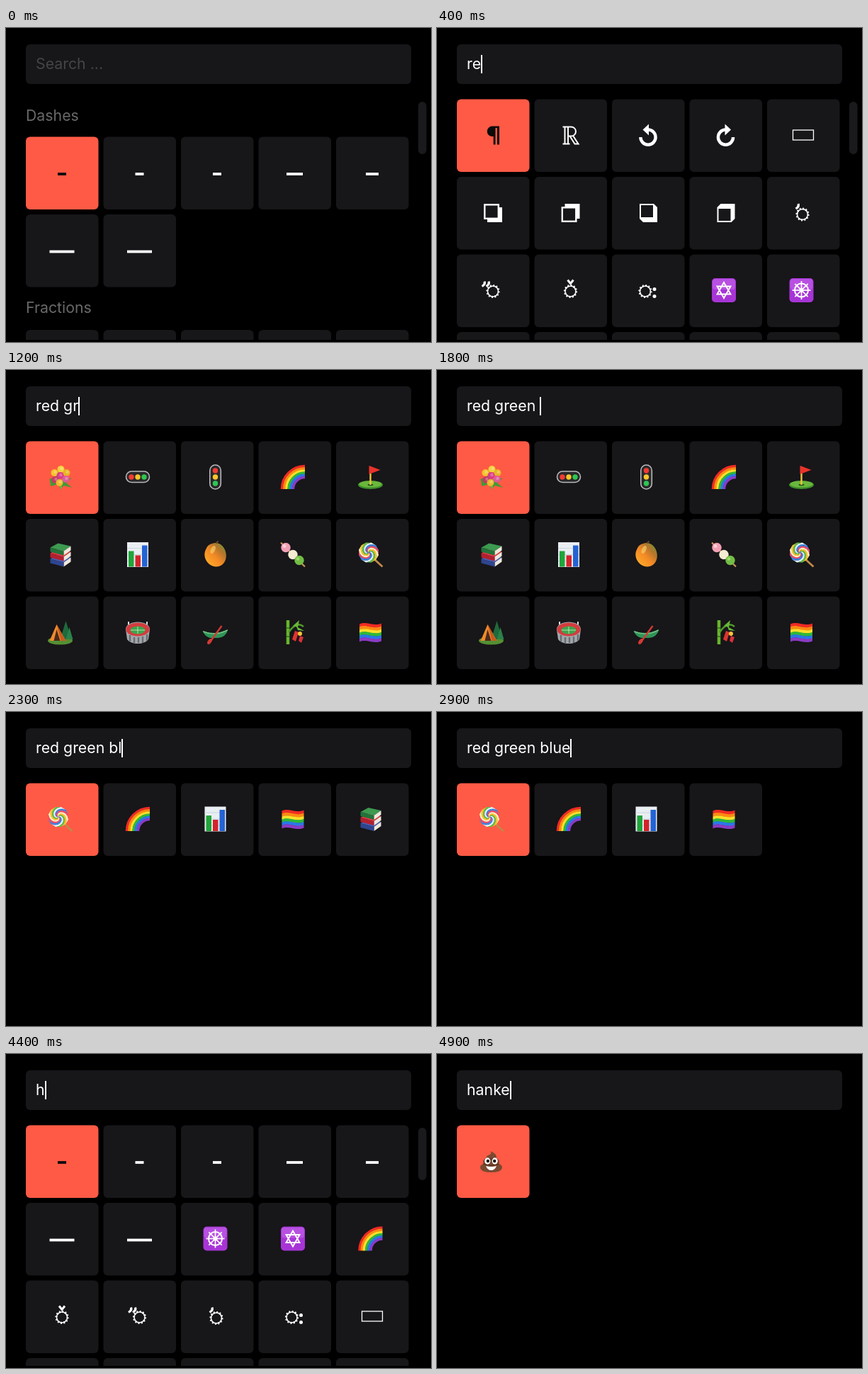
These frames come from a looping animation (600x443 px, 5000 ms). An HTML page:

```html
<!DOCTYPE html>
<html lang="en">
<head>
<meta charset="utf-8">
<title>Symbol search</title>
<style>
  html, body { margin: 0; width: 100%; height: 100%; overflow: hidden; background: #000; }
  #stage { position: relative; width: 600px; height: 443px; overflow: hidden; font: 21.3px Inter, sans-serif; }
  #field { position: absolute; left: 28px; top: 23px; width: 544px; height: 56px; border-radius: 6px; background: #171619; }
  #query { position: absolute; left: 14px; top: 0; line-height: 55px; white-space: pre; color: #fff; }
  #query.empty { color: #454447; }
  #caret { position: absolute; top: 15px; width: 2px; height: 26px; background: #fff; }
  svg { position: absolute; left: 0; top: 0; }
  svg text { fill: #69686b; }
</style>
</head>
<body>
<div id="stage">
  <svg id="view" width="600" height="443"></svg>
  <div id="field"><span id="query"></span><i id="caret"></i></div>
</div>
<script>
const LOOP = 5000;
const $ = id => document.getElementById(id);

// Drawing helpers; every glyph is centred on 0,0.
const path = (d, fill, extra = '') => `<path d="${d}" fill="${fill}" ${extra}/>`;
const line = (d, color, w = 2) => path(d, 'none', `stroke="${color}" stroke-width="${w}"`);
const oval = (x, y, rx, ry, fill, extra = '') =>
  `<ellipse cx="${x}" cy="${y}" rx="${rx}" ry="${ry}" fill="${fill}" ${extra}/>`;
const dot = (x, y, r, fill, extra) => oval(x, y, r, r, fill, extra);
const rect = (x, y, w, h, fill, r = 0, extra = '') =>
  `<rect x="${x}" y="${y}" width="${w}" height="${h}" rx="${r}" fill="${fill}" ${extra}/>`;
const group = (transform, body) => `<g transform="${transform}">${body}</g>`;

const RAINBOW = ['#f02b24', '#ff8a12', '#ffe02a', '#2fb83a', '#2a78e8', '#8b3bc4'];

const ring = (x, y) =>
  `<circle cx="${x}" cy="${y}" r="7.6" fill="none" stroke="#fff" stroke-width="1.5"/>` +
  `<circle cx="${x}" cy="${y}" r="8" fill="none" stroke="#fff" stroke-width="3.2" stroke-dasharray="1.7 2.49"/>`;
const tick = x => line(`M${x} -13q1.5 4 -3.5 7`, '#fff', 3.2);
const badge = body => rect(-17, -17, 34, 34, '#a735d6', 5) +
  rect(-16, -16, 32, 15, '#b850e2', 4) + body;
const lamps = spots => spots.map(([x, y], i) =>
  dot(x, y, 3.7, ['#f23b32', '#fbc52b', '#2fc552'][i])).join('');

const turn = line('M0 -8A10.6 10.6 0 1 1 -10.6 2.6', '#fff', 4.4) + path('M1 -16V0L-7.5 -8z', '#fff');

function swirl() {
  const arms = 12, colors = ['#ef4a6b', '#fff3c4', '#f7c32e', '#5cbf4a', '#e8f4ff', '#3d83e0'];
  const edge = k => Array.from({ length: 9 }, (_, i) => {
    const r = i * 14.5 / 8, a = (k / arms) * 2 * Math.PI + i * 0.36;
    return [(r * Math.cos(a)).toFixed(1), (r * Math.sin(a)).toFixed(1)];
  });
  return Array.from({ length: arms }, (_, k) =>
    path('M' + edge(k).concat(edge(k + 1.08).reverse()).join('L') + 'z', colors[k % 6])).join('');
}

function book(y, cover, spine) {
  return path(`M-14 ${y}L-3 ${y - 6}L15 ${y - 2}L5 ${y + 5}z`, cover) +
    path(`M5 ${y + 5}L15 ${y - 2}V${y + 4}L5 ${y + 11}z`, '#eee8dc') +
    path(`M-14 ${y}L5 ${y + 5}V${y + 11}L-14 ${y + 6}z`, spine);
}

const symbols = {
  pilcrow: path('M9 -13H-1a7.3 7.3 0 0 0 0 14.6h1.7V13h2.8V-10.4h2.4V13H9z', 'currentColor'),
  reals: line('M-11 -12H1a6.5 6.5 0 0 1 0 13H-4M-8 -12V12M-3.5 -12V12M-11 12H-1M-1 1L6 12H11L3.5 .5', '#fff'),
  undo: turn,
  redo: group('scale(-1 1)', turn),
  bar: rect(-14.5, -7.5, 29, 14, 'none', 0, 'stroke="#fff" stroke-width="1.3"'),
  dropLow: rect(-8, -8, 21, 21, '#fff') + rect(-11.7, -11.7, 19.5, 19.5, '#171619', 0, 'stroke="#fff" stroke-width="2.4"'),
  dropHigh: rect(-8, -13, 21, 21, '#fff') + rect(-11.7, -7.7, 19.5, 19.5, '#171619', 0, 'stroke="#fff" stroke-width="2.4"'),
  boxLow: path('M-12 -13H8L13 -8V13H-7L-12 8z', '#fff') + rect(-10, -11, 17, 17, '#171619'),
  boxHigh: path('M-12 -8L-7 -13H13V8L8 13H-12z', '#fff') + rect(-10, -6, 17, 17, '#171619'),
  single: tick(-7) + ring(-1, 2),
  double: tick(-12) + tick(-6) + ring(0, 1),
  caron: line('M-4 -15L0 -10L4 -15', '#fff', 3) + ring(0, 1),
  colon: ring(-4, 1) + dot(9, -2, 2.5, '#fff') + dot(9, 8, 2.5, '#fff')
};

const emoji = {
  star: badge(line('M0 -11L9.5 5.5H-9.5zM0 11L-9.5 -5.5H9.5z', '#fff', 1.9)),
  wheel: badge(dot(0, 0, 9.5, 'none', 'stroke="#fff" stroke-width="2"') + dot(0, 0, 3, '#fff') +
    [0, 45, 90, 135].map(a => group(`rotate(${a})`, line('M-13 0H13', '#fff', 1.7))).join('')),
  bouquet: path('M-15 3L-4 -2L2 6L16 1L9 9L17 15L5 12L1 17L-3 10L-13 13z', '#3f9a35') +
    line('M-2 3L2 16M4 2L0 14', '#6fbb3f') +
    [[-8, -6, '#f4c52c'], [1, -11, '#f2d23c'], [9, -6, '#e8b524'], [0, -2, '#d83d86'], [-7, 4, '#c43a63'],
     [8, 3, '#df5b9a'], [-1, 8, '#efb72f']].map(([x, y, c]) => dot(x, y, 5, c) + dot(x + 1, y - 1, 2.2, '#fff4')).join(''),
  lightsH: rect(-16.5, -8, 33, 15.5, '#29292b', 7.7, 'stroke="#b9b9bb" stroke-width="1.6"') +
    lamps([[-9, 0], [0, 0], [9, 0]]),
  lightsV: rect(-7.7, -17, 15.5, 34, '#29292b', 7.7, 'stroke="#b9b9bb" stroke-width="1.6"') +
    lamps([[0, -9], [0, 0], [0, 9]]),
  rainbow: RAINBOW.map((c, i) => {
    const r = 32.5 - i * 3.2;
    return line(`M${17 - r} 17A${r} ${r} 0 0 1 17 ${17 - r}`, c, 3.5);
  }).join(''),
  golf: oval(0, 11, 17.5, 6, '#3f8f2c') + oval(0, 10, 16, 4.6, '#69b83c') + oval(0, 11, 4, 1.3, '#24511d') +
    line('M0 -15V11', '#f3c43c', 2.4) + path('M-2 -16L14 -10L-2 -4z', '#ea3329'),
  books: book(6, '#4a61b8', '#2f458e') + book(-2, '#e23b43', '#b3202e') + book(-10, '#3d9a50', '#23733a'),
  chart: rect(-15, -17.5, 30, 35, '#e9eef3') + line('M-15 -9H15M-15 0H15M-15 9H15', '#cbd5df', 1) +
    rect(-13, -5, 7.5, 22, '#20a43a') + rect(-3.5, 1, 7.5, 16, '#d3242c') + rect(6, -13, 7.5, 30, '#2463d4'),
  mango: path('M-3 -16C9 -19 17 -6 15 5C13 15 4 19 -4 16C-14 12 -18 0 -13 -8C-11 -13 -8 -15 -3 -16z', 'url(#mango)') +
    line('M1 -16L4 -19', '#6b4a22', 2) + oval(-6, -5, 3, 6, '#ffe37a88', 'transform="rotate(25)"'),
  dango: line('M-17 -17L17 17', '#c99452', 2.2) + dot(-10, -10, 6.7, '#f2a0b5') + dot(0, 0, 6.7, '#f5ecd2') +
    dot(9, 8, 6.7, '#72bd45') + dot(-12, -12, 2.4, '#ffd0db') + dot(7, 6, 2.2, '#9dda6c'),
  lollipop: line('M5 6L17 17', '#c08a4a', 2.8) + group('translate(-2.5 -3)', swirl()),
  tent: oval(0, 12, 17.5, 5.5, '#548f33') + path('M8 -16L16 10H0z', '#1f6a3c') + path('M13 -7L18 10H8z', '#2c8049') +
    path('M-5 -11L8 12H-15z', '#ef8a2c') + path('M-5 -11L8 12H1z', '#c95a1d') + path('M-5 -4L0 12H-9z', '#4a2a1b'),
  stadium: path('M-17 -4C-17 -18 17 -18 17 -4L15 10C9 18 -9 18 -15 10z', '#a3a7ab') +
    oval(0, -4, 16.5, 9.5, '#d43c3e') + oval(0, -3, 10.5, 5.5, '#3fa34b') + line('M0 -8V2M-10 -3H10', '#d8f0d0', 0.8) +
    line('M-11 4V13M-5 7V15M1 7V15M7 6V15M13 3V12', '#686d72', 2.4) + line('M-13 -11V-15M13 -11V-15', '#ddd', 2),
  canoe: path('M-18 -2Q0 5 18 -4Q15 7 4 8H-7Q-15 6 -18 -2z', '#2f9457') + line('M-17 -1Q0 6 17 -3', '#74c486', 1.5) +
    line('M-7 13L9 -9', '#d33a35', 2.4) + oval(-8, 13, 2.5, 4.5, '#d33a35', 'transform="rotate(36 -8 13)"'),
  bamboo: line('M-7 -17V17', '#69b42d', 4.5) + line('M-9 -6H-5M-9 6H-5', '#2e701f', 1.6) +
    line('M-6 0Q5 -16 15 -8', '#519c2b', 2.5) + path('M0 -9L9 -17L7 -7zM5 -8L16 -2L7 -3z', '#66b936') +
    path('M3 -2L8 0L4 13L-1 10z', '#dc3431') + dot(10, 2, 3, '#f3c43c') + path('M10 5L15 7L12 15L8 12z', '#d8323a'),
  flag: RAINBOW.map((c, i) => {
    const y = -11.5 + i * 4.1;
    return path(`M-15.5 ${y}C-6 ${y - 5} 4 ${y + 4} 15.5 ${y - 1}v4.5C4 ${y + 8.5} -6 ${y - .5} -15.5 ${y + 4.5}z`, c);
  }).join(''),
  poop: path('M-1 -14Q9 -10 7 -4Q13 -2 11 4Q17 6 15 11Q13 16 0 16Q-13 16 -15 11Q-17 6 -11 4Q-13 -2 -7 -4Q-7 -8 -2 -9Q1 -11 -1 -14z', '#7b4931') +
    line('M-7 -4Q0 -1 7 -5M-11 4Q0 8 11 4', '#5a3120', 1.5) +
    [-5.2, 5.2].map(x => oval(x, 0, 4, 4.7, '#fff') + dot(x * .9, 0, 2.2, '#17110f')).join('') +
    path('M-7.5 7Q0 9 7.5 7Q5 13 0 13Q-5 13 -7.5 7z', '#fff')
};

function glyph(name) {
  if (!name) return '';
  if (name[0] === '-') return rect(name / 2, -0.4, -name, 3.8, 'currentColor');
  return symbols[name] || group('translate(-2.5 -.5)', emoji[name]);
}

function tiles(names, top, selected = 0) {
  return names.map((name, i) => {
    const x = 28 + (i % 5) * 109.5, y = top + Math.floor(i / 5) * 109.5, on = i === selected;
    return rect(x, y, 102.5, 102.5, on ? '#ff5a45' : '#171619', 6) +
      `<g transform="translate(${x + 51} ${y + 51})" color="${on ? '#0d0b0b' : '#fff'}">${glyph(name)}</g>`;
  }).join('');
}

const list = s => s.split(' ');
const pad = names => names.concat(Array(20 - names.length).fill(''));
const thumb = rect(582, 104, 11.5, 74, '#1a191c', 5.7);
const dashes = list('-12 -12 -12 -23 -18 -35 -35');
const grid = (names, more) => tiles(more ? pad(names) : names, 100.5) + (more ? thumb : '');

const marks = list('pilcrow reals undo redo bar dropLow dropHigh boxLow boxHigh single double caron colon star wheel');
const mixed = list('bouquet lightsH lightsV rainbow golf books chart mango dango lollipop tent stadium canoe bamboo flag');
const reds = list('golf lightsH lightsV bouquet rainbow mango books chart canoe flag lollipop tent stadium bamboo dango');

const views = {
  home: '<text x="28" y="130.8">Dashes</text><text x="28" y="402.3">Fractions</text>' +
    tiles(dashes, 153.5) + tiles(Array(5).fill(''), 426, -1) + thumb,
  marks: grid(marks, true),
  reds: grid(reds, true),
  none: '',
  mixed: grid(mixed),
  five: grid(list('lollipop rainbow chart flag books')),
  four: grid(list('lollipop rainbow chart flag')),
  letters: grid(dashes.concat(list('wheel star rainbow caron double single colon bar')), true),
  one: grid(['poop'])
};

// time, query, view, caret hidden
const steps = [
  [0, '', 'home', true],
  [200, 'r', 'marks'], [400, 're', 'marks'],
  [600, 'red', 'reds'], [800, 'red ', 'reds'], [900, 'red g', 'none'],
  [1100, 'red gr', 'none'], [1200, 'red gr', 'mixed'], [1300, 'red gre', 'mixed'],
  [1500, 'red gree', 'mixed'], [1700, 'red green', 'mixed'], [1800, 'red green ', 'mixed'],
  [2100, 'red green b', 'five'], [2300, 'red green bl', 'five'],
  [2500, 'red green blu', 'four'], [2700, 'red green blue', 'four'],
  [3100, 'red green blue', 'four', true], [3600, 'red green blue', 'four'],
  [3800, '', 'home'],
  [4300, 'h', 'letters'], [4500, 'ha', 'letters'], [4600, 'han', 'letters'],
  [4800, 'hank', 'one'], [4900, 'hanke', 'one']
];

const defs = '<defs><linearGradient id="mango" x1="0" y1="1" x2="1" y2="0"><stop offset="0" stop-color="#ffb52a"/>' +
  '<stop offset=".45" stop-color="#f58a25"/><stop offset=".7" stop-color="#b5762c"/><stop offset="1" stop-color="#5d9a35"/>' +
  '</linearGradient><clipPath id="page"><path d="M0 0H600V440H0z"/></clipPath></defs>';

let shown = null;
function show(step) {
  const [, query, view, hidden] = step;
  $('view').innerHTML = defs + `<g clip-path="url(#page)">${views[view]}</g>`;
  $('query').textContent = query || 'Search ...';
  $('query').className = query ? '' : 'empty';
  $('caret').style.left = 14 + (query ? $('query').getBoundingClientRect().width : 0) + 'px';
  $('caret').style.visibility = hidden ? 'hidden' : 'visible';
}

const start = performance.now();
function tickFrame() {
  const t = (performance.now() - start) % LOOP;
  const step = steps.findLast(s => s[0] <= t);
  if (step !== shown) show(shown = step);
  requestAnimationFrame(tickFrame);
}
tickFrame();
</script>
</body>
</html>
```
